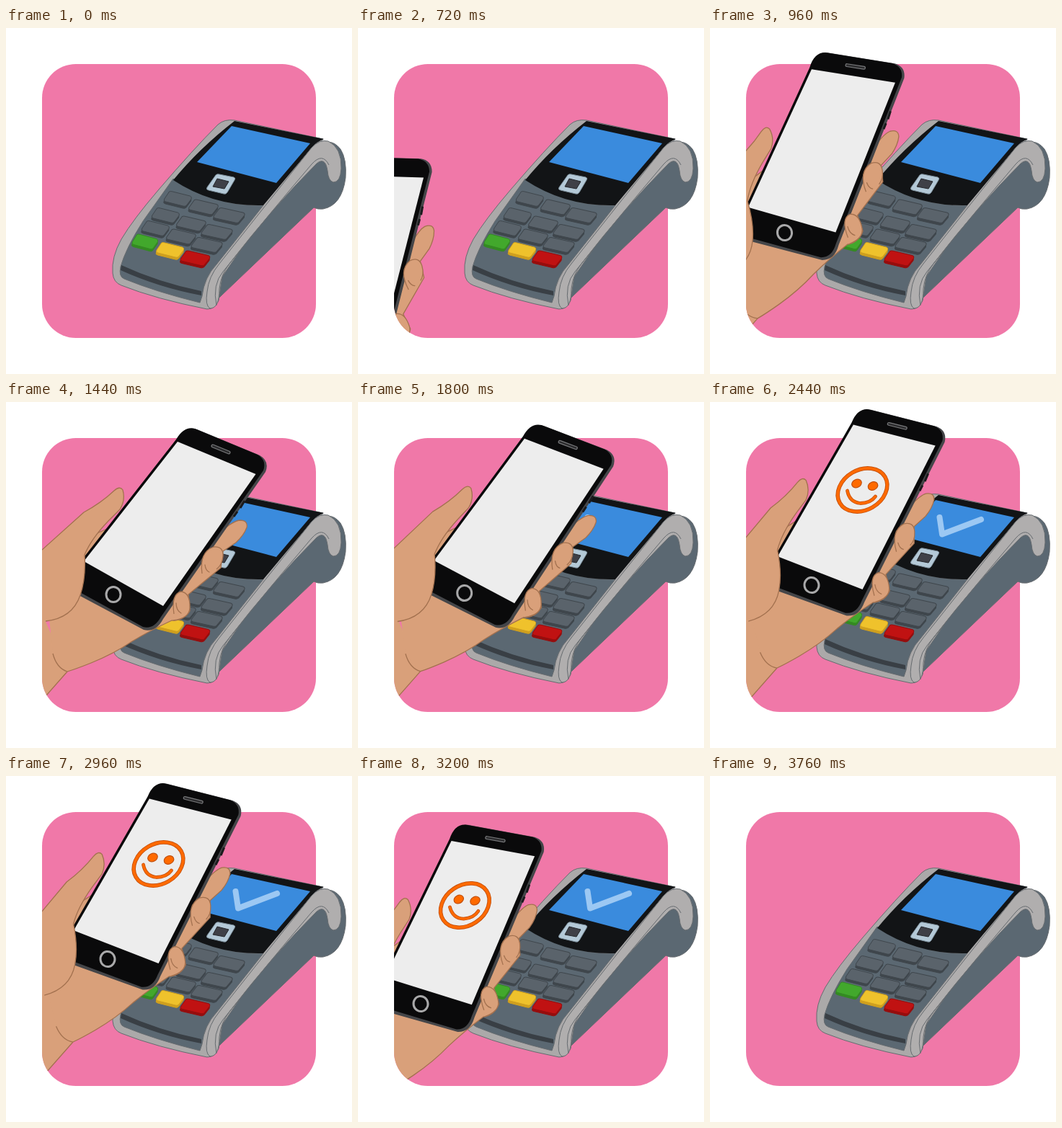
Animation of 480x480 px, one loop 4520 ms. Source, as an HTML page:

```html
<!DOCTYPE html>
<html lang="en">
<head>
<meta charset="utf-8">
<title>Contactless payment</title>
<style>
  html, body { margin: 0; height: 100%; overflow: hidden; background: #fff; }
  svg { display: block; width: 100vw; height: 100vh; }
  path { stroke-linejoin: round; }
  .skin { fill: #d9a07a; stroke: #a3714f; stroke-width: 1.3; }
  .line { fill: none; stroke: #a3714f; stroke-width: 1.3; stroke-linecap: round; }
  .edge { stroke: #666b6f; stroke-width: 1; }
  .face * { fill: none; stroke-linecap: round; }
  .face .dot { fill: #ff6a00; stroke: #c24e08; stroke-width: 1.2; }
</style>
</head>
<body>
<svg viewBox="0 0 480 480">
  <clipPath id="card"><rect x="50" y="-100" width="380" height="530" rx="47"/></clipPath>
  <rect x="50" y="50" width="380" height="380" rx="47" fill="#f078a8"/>

  <g id="terminal">
    <path class="edge" fill="#5b6872" d="M430 165Q450 150 464 168Q473 182 471 208Q466 246 440 251Q432 252 427 249L300 370L285 385L290 320Z"/>
    <path class="edge" fill="#aba9a9" d="M148 340Q146 318 160 293Q176 266 212 224Q260 168 294 134Q303 126 317 128L440 154L357 262L300 345L295 378Q290 390 279 390Q208 376 160 357Q149 353 148 340Z"/>
    <path class="edge" fill="#5b6872" d="M232 209Q290 248 357 246L292 328Q275 346 272 372L269 381Q208 366 164 348Q156 345 159 331Q166 306 190 268Z"/>
    <path fill="#121416" d="M317 129L441 154Q432 157 424 166L357 246Q288 248 232 211Q268 167 317 129Z"/>
    <path class="edge" fill="#b0aeae" d="M424 166Q435 154 447 157Q466 166 465 195Q464 214 454 214Q447 212 446 198Q443 178 431 188Q370 249 310 327Q298 342 296 362Q296 389 283 389Q276 385 279 366Q281 345 296 327Q360 246 424 166Z"/>
    <path class="edge" fill="none" d="M292 385Q286 356 301 338Q365 258 424 189Q439 172 448 190"/>
    <path fill="#393f45" d="M160 329Q212 353 271 365V371Q212 360 159 336Z"/>
    <path fill="#3a8bdd" d="M313 136L422 160L375 215L265 186Z"/>
    <path id="check" pathLength="1" fill="none" stroke="#9cc8f3" stroke-width="8" d="M318.5 160L322 183.5L376 163"/>
    <path fill="#b4c9d7" stroke="#7c8e9a" d="M291 204Q293 202 296 203L316 207Q319 208 317 211L307 228Q305 231 302 230L281 225Q277 224 279 221Z"/>
    <path fill="#3f4047" stroke="#24262a" d="M293 209L309 213L303 223L287 220Z"/>
    <g id="keys"></g>
  </g>

  <g clip-path="url(#card)">
    <g id="hand">
      <path id="arm" class="skin" d="M85 374L-42 518L-300 300L40 270"/>
      <path class="skin" d="M65 349Q70 369 85 374Q98 370 118 362Q150 349 175 332Q200 317 230 303Q246 304 255 290L253 267L298 230L301 207L319 195Q330 185 334 174Q336 164 324 164Q316 165 300 178L200 150L108 190L50 205"/>

      <path fill="#454649" d="M238 50Q249 33 265 38L352 74Q366 82 360 97L218 301Q208 320 191 316L99 267L95 235Z"/>
      <path fill="#0a0a0b" d="M236 52Q247 33 262 37L349 73Q362 81 357 95L215 298Q205 316 190 312L99 262L95 232Z"/>
      <path stroke="#1b1b1d" stroke-width="3" d="M331 137L325 147M321 152L316 159"/>
      <path fill="#ededed" d="M238 55L346.5 100L218 283L108 221Z"/>
      <g fill="none" stroke-linecap="round">
        <path stroke="#77787a" stroke-width="5" d="M287 61L309 70"/>
        <path stroke="#2b2b2d" stroke-width="2.6" d="M287 61L309 70"/>
        <ellipse cx="149" cy="267" rx="10" ry="10.6" stroke="#a9a9aa" stroke-width="3"/>
      </g>
      <g id="smile" class="face"></g>

      <path class="skin" d="M272 238Q268 208 288 201Q302 200 301 214Q300 226 292 232"/>
      <path class="skin" d="M233 294Q229 266 243 263Q256 265 255 286Q254 300 232 303"/>
      <path class="line" d="M236 279Q236 289 243 293M276 226Q277 234 282 236"/>
      <path class="skin" d="M-120 330L50 205L108 153Q132 140 150 123Q158 116 162 122Q166 136 158 149L142 165Q118 190 109 212Q111 245 103 268Q92 300 55 304"/>
    </g>
  </g>
</svg>
<script>
const LOOP = 4520, STEP = 40, IN = 640, OUT = 3760;
const HOME = [149, 267], BASE = 36.4;
const $ = id => document.getElementById(id);

// time, home button x, y, phone angle
const poses = [
  [640, -110, 522, 14], [800, 30, 360, 17.5], [960, 103.5, 284, 23],
  [1080, 134, 262, 27.5], [1440, 149, 267, 36.4], [1680, 149, 267, 36.2],
  [2080, 142, 256, 29.4], [2280, 141, 254, 28.2], [2960, 141, 254, 28.2],
  [3040, 140, 249.5, 28], [3200, 87, 316, 24.3], [3320, 8, 405, 20],
  [3480, -135, 565, 14], [3760, -200, 640, 14]
];

const ramp = (t, from, to) => Math.min(1, Math.max(0, (t - from) / (to - from)));
const easeOut = u => 1 - (1 - u) ** 2;

const slope = (i, k) => (poses[i + 1][k] - poses[i][k]) / (poses[i + 1][0] - poses[i][0]);
function tangent(i, k) {
  if (i === 0 || i === poses.length - 1) return slope(i ? i - 1 : 0, k);
  const a = slope(i - 1, k), b = slope(i, k);
  return a * b > 0 ? 2 * a * b / (a + b) : 0;
}

// monotone cubic through the poses
function poseAt(t) {
  let i = 0;
  while (i < poses.length - 2 && t >= poses[i + 1][0]) i++;
  const span = poses[i + 1][0] - poses[i][0];
  const u = ramp(t, poses[i][0], poses[i + 1][0]), v = 1 - u;
  return [1, 2, 3].map(k =>
    poses[i][k] * v * v * (1 + 2 * u) + poses[i + 1][k] * u * u * (3 - 2 * u) +
    span * u * v * (tangent(i, k) * v - tangent(i + 1, k) * u));
}

function buildKeys() {
  const shape = 'M-12-11Q-10-12-7-11L18-5Q21-4 20-1L13 8Q11 10 8 9L-17 3Q-21 2-19-1Z';
  const rows = [[238, 238], [221, 261], [207, 279], [192.5, 297.5]];
  const tones = [['#42a82c', '#348a22'], ['#efc22c', '#cf9f1e'], ['#c01212', '#960d0d']];
  let out = '';
  rows.forEach(([x, y], row) => {
    for (let col = 0; col < 3; col++) {
      const [top, side] = row === 3 ? tones[col] : ['#5a636b', '#3f464c'];
      const cx = x + col * (row === 3 ? 34.8 : 35.6), cy = y + col * 11.5;
      out += `<g transform="translate(${cx} ${cy})scale(${row === 3 ? .9 + col * .06 : .96 + col * .06},1)">
        <path d="${shape}" transform="translate(-.5 3)" fill="${side}" stroke="${side}"/>
        <path d="${shape}" fill="${top}" stroke="${side}"/></g>`;
    }
  });
  $('keys').innerHTML = out;
}

function smileMarkup(t) {
  const drawn = easeOut(ramp(t, 1800, 2060)), grow = easeOut(ramp(t, 2080, 2400));
  if (!drawn) return '';
  const stroke = (color, width) => `<g stroke="${color}" stroke-width="${width}" stroke-dasharray="${drawn} 2">
    <ellipse rx="36.2" ry="27.8" transform="rotate(-30)" pathLength="1"/>
    <path d="M-21 1Q-18 17-3 18.5Q11 18.5 18 9" stroke-width="${width * .85}" pathLength="1"/></g>`;
  const eye = (x, y) => `<ellipse class="dot" cx="${x}" cy="${y}" rx="${drawn * (4 + 3 * grow)}" ry="${drawn * (3.3 + 2.2 * grow)}" transform="rotate(-25 ${x} ${y})"/>`;
  const x = 70.5 + 3 * (1 - grow), y = -132 - 6 * (1 - grow);
  return `<g transform="translate(${HOME})rotate(8.2)translate(${x} ${y})scale(${.95 + .05 * grow})">
    ${stroke('#c8520a', 2.4 + 3.2 * grow)}${stroke('#ff6a00', 1 + 2.6 * grow)}
    ${eye(-8, -9)}${eye(14.5, -5.5)}</g>`;
}

function draw(t) {
  const active = t >= IN && t < OUT;
  $('hand').style.display = active ? '' : 'none';
  const checked = active ? easeOut(ramp(t, 1760, 2320)) : 0;
  $('check').style.display = checked ? '' : 'none';
  if (!active) return;
  $('check').setAttribute('stroke-dasharray', `${checked} 2`);
  $('check').setAttribute('stroke-linecap', 'round');
  const [x, y, angle] = poseAt(t), turn = angle - BASE;
  $('hand').setAttribute('transform', `translate(${x} ${y})rotate(${turn})translate(${-HOME[0]} ${-HOME[1]})`);
  $('arm').setAttribute('transform', `rotate(${-turn} 85 374)`);
  $('smile').innerHTML = smileMarkup(t);
}

buildKeys();
const start = performance.now();
function tick() {
  const t = (performance.now() - start) % LOOP;
  draw(Math.floor(t / STEP) * STEP);
  requestAnimationFrame(tick);
}
tick();
</script>
</body>
</html>
```
